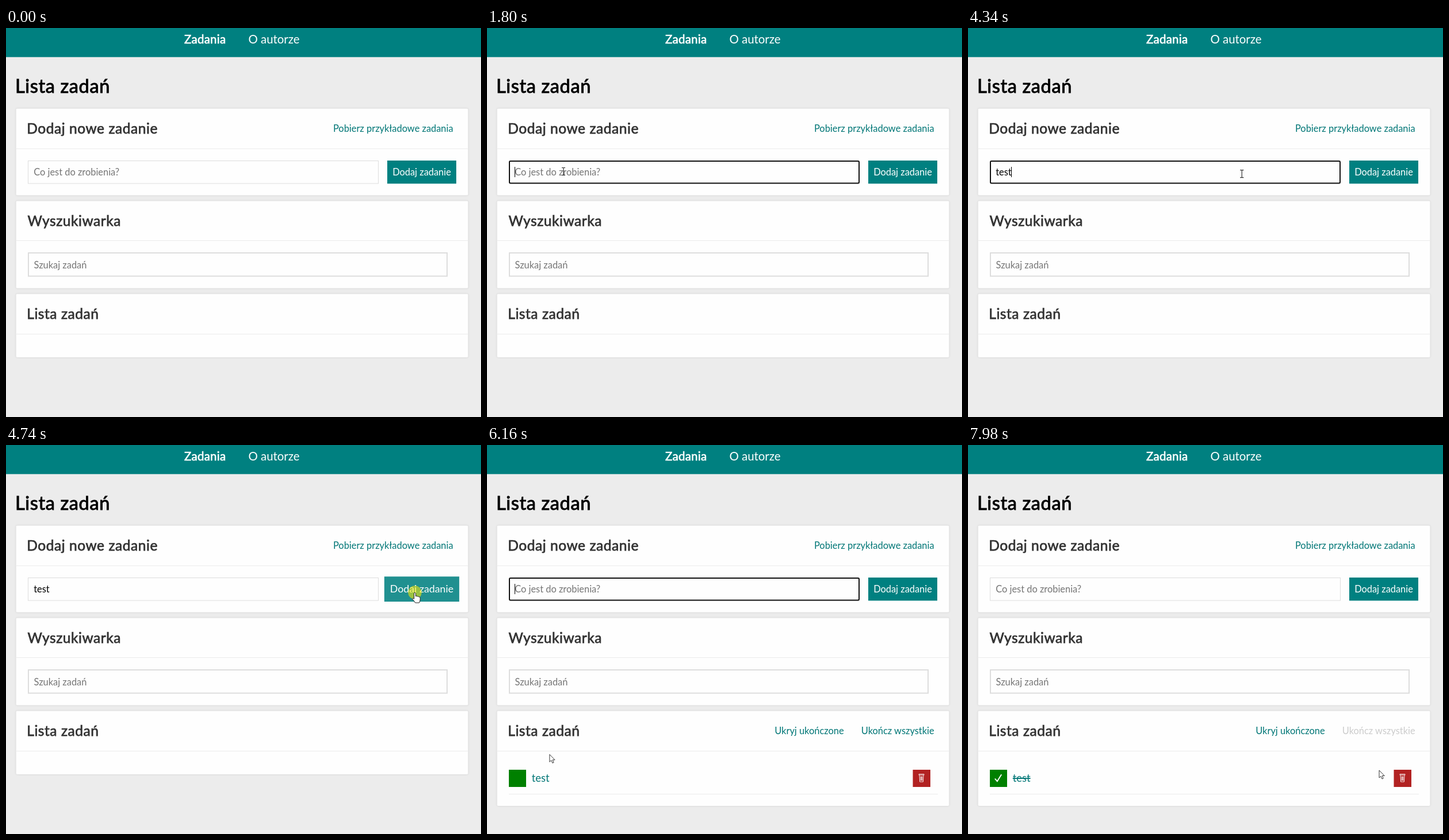
An HTML page that plays this animation: 826 by 678 pixels, repeating every 8 s.

```html
<!DOCTYPE html>
<html lang="pl">
<head>
<meta charset="utf-8">
<title>Lista zadań</title>
<style>
html, body { margin: 0; width: 100%; height: 100%; overflow: hidden; background: #ececec; }
svg { display: block; font: 16.4px Lato, sans-serif; }
.card { fill: #fefefe; filter: drop-shadow(0 0 1.5px #ccc); }
.line { stroke: #ebebeb; }
.nav { font-size: 20.4px; fill: #fff; }
.bold { stroke: #fff; stroke-width: .7px; letter-spacing: .3px; }
.h1 { font-size: 32.6px; letter-spacing: .6px; stroke: #000; stroke-width: .9px; }
.h2 { font-size: 24.5px; letter-spacing: .55px; fill: #333; stroke: #333; stroke-width: .75px; }
.link { fill: #007676; text-anchor: end; }
.hint { fill: #757575; }
.field { fill: #fefefe; stroke: #ddd; }
.task { font-size: 18.4px; fill: #007676; }
</style>
</head>
<body>
<svg width="826" height="678" viewBox="0 0 826 678">
  <rect width="826" height="50.7" fill="#008080"/>
  <text class="nav bold" x="310" y="27">Zadania</text>
  <text class="nav" x="421.5" y="27">O autorze</text>
  <text class="h1" x="16" y="113">Lista zadań</text>

  <rect class="card" x="17.5" y="140.5" width="786" height="151" rx="2"/>
  <path class="line" d="M18 210.5H803"/>
  <text class="h2" x="36.3" y="184.3">Dodaj nowe zadanie</text>
  <text class="link" x="777.6" y="181">Pobierz przykładowe zadania</text>
  <rect class="field" x="38.5" y="231.5" width="609" height="39.5"/>
  <rect id="focus" x="39" y="232" width="608" height="38.5" rx="2" fill="none" stroke="#111" stroke-width="2"/>
  <text id="hint" class="hint" x="48.2" y="257">Co jest do zrobienia?</text>
  <text id="typed" x="48.2" y="257"></text>
  <rect id="caret" y="242" width="1" height="18"/>
  <g id="button">
    <rect x="663" y="231" width="120" height="40.3" fill="#008080"/>
    <text x="723" y="257" fill="#fff" text-anchor="middle">Dodaj zadanie</text>
  </g>

  <rect class="card" x="17.5" y="301.5" width="786" height="152" rx="2"/>
  <path class="line" d="M18 370.5H803"/>
  <text class="h2" x="37.5" y="344.5">Wyszukiwarka</text>
  <rect class="field" x="39" y="392" width="728" height="40.5" stroke-width="2"/>
  <text class="hint" x="48.6" y="419">Szukaj zadań</text>

  <rect id="list" class="card" x="17.5" y="463.5" width="786" height="110.5" rx="2"/>
  <path class="line" d="M18 533.5H803"/>
  <text class="h2" x="36.3" y="507.3">Lista zadań</text>
  <g id="item">
    <text class="link" x="620.6" y="504">Ukryj ukończone</text>
    <text id="finish" class="link" x="777.6" y="504">Ukończ wszystkie</text>
    <rect id="box" x="38" y="566" width="30" height="30" fill="#008000"/>
    <path id="check" d="M46.8 581.5l4 4.7 7.4-12" fill="none" stroke="#fff" stroke-width="1.9"/>
    <text id="task" class="task" x="77.8" y="587">test</text>
    <rect x="740.5" y="566" width="30.5" height="30" fill="#b22222"/>
    <path d="M751 575.2v-1.5h9v1.5zM752 575.5l.6 11.5h5.8l.6-11.5M754 577.5v7.5M755.5 577.5v7.5M757 577.5v7.5" fill="none" stroke="#fff" stroke-width=".9"/>
    <path class="line" d="M38 608.5H784"/>
  </g>

  <g id="pointer">
    <circle id="click" r="11.8" fill="#ffeb00" fill-opacity=".55"/>
    <path id="arrow" d="M0 0v13l3-2.7 2 4.7 2.2-1-2-4.5h4z" fill="#fff" stroke="#222" stroke-width=".9"/>
    <path id="beam" d="M-3-6.5h2.2l.8.7.8-.7H3M0-6V6M-3 6.5h2.2l.8-.7.8.7H3" fill="none" stroke="#222" stroke-width="1.1"/>
    <path id="hand" d="M-1.4 1.2Q0-.8 1.4 1.2V6.5Q3 5.2 4.2 7 6 6 6.8 7.8 9 7 9.2 9.5V13Q9 15 7.6 18H.6Q-1 15-4.4 11.6-4.6 9.2-1.4 11.2z" fill="#fff" stroke="#222" stroke-width="1"/>
  </g>
</svg>
<script>
const $ = id => document.getElementById(id);
const show = (id, on) => { $(id).style.display = on ? '' : 'none'; };
const during = (t, ...spans) => spans.some(([a, b]) => t >= a && t < b);
const ramp = (t, a, b) => Math.min(1, Math.max(0, (t - a) / (b - a)));

// start, end, steps, target x, y, optional bend x, y
const moves = [
  [180, 600, 5, 355, 183],
  [800, 1500, 8, 133, 250],
  [4020, 4740, 8, 711, 257],
  [5140, 5760, 7, 128, 528, 436, 502],
  [6160, 6560, 5, 52, 573],
  [6980, 7680, 8, 644, 561],
  [7780, 7980, 3, 715, 567]
];

function pointerAt(t) {
  let x = 905, y = 755;
  for (const [start, end, steps, tx, ty, bx = (x + tx) / 2, by = (y + ty) / 2] of moves) {
    if (t < start) break;
    const step = Math.min(steps, 1 + Math.floor((t - start) / (end - start) * (steps - 1) + .01));
    const s = 1 - (1 - step / steps) ** 1.3, r = 1 - s;
    x = r * r * x + 2 * r * s * bx + s * s * tx;
    y = r * r * y + 2 * r * s * by + s * s * ty;
  }
  return [x, y];
}

function draw(t) {
  const added = t >= 4840, done = t >= 6980;
  const letters = added ? 0 : [2510, 2710, 2910, 3120].filter(key => t >= key).length;
  $('typed').textContent = 'test'.slice(0, letters);
  show('hint', !letters);
  show('focus', during(t, [1800, 4740], [4840, 6880]));
  show('caret', during(t, [1800, 2310], [2510, 3620], [4120, 4620], [4840, 5440], [5960, 6460]));
  $('caret').setAttribute('x', 48 + (letters ? Math.round($('typed').getComputedTextLength()) : 0));

  const hover = ramp(t, 4500, 4780) - ramp(t, 5140, 5273);
  const scale = 1 + .1 * hover;
  $('button').setAttribute('transform', `translate(723 251.2) scale(${scale}) translate(-723 -251.2)`);
  $('button').setAttribute('opacity', 1 - .15 * hover);

  $('list').setAttribute('height', added ? 165.5 : 110.5);
  show('item', added);
  show('check', done);
  $('task').style.textDecoration = done ? 'line-through' : '';
  $('finish').style.fill = done ? '#ccc' : '';

  const [x, y] = pointerAt(t);
  const inside = (l, top, r, b) => x > l && x < r && y > top && y < b;
  const onBox = inside(38, 566, 68, 596);
  const hand = onBox || inside(663, 231, 783, 271);
  const beam = inside(38, 231, 648, 271) || inside(38, 391, 768, 433);
  $('box').setAttribute('fill', onBox ? '#22a022' : '#008000');
  $('pointer').setAttribute('transform', `translate(${x} ${y})`);
  show('pointer', t >= 180);
  show('hand', hand);
  show('beam', beam);
  show('arrow', !hand && !beam);
  show('click', during(t, [4740, 4840], [6880, 6980]));
}

function loop() {
  draw(performance.now() % 8000);
  requestAnimationFrame(loop);
}
loop();
</script>
</body>
</html>
```
